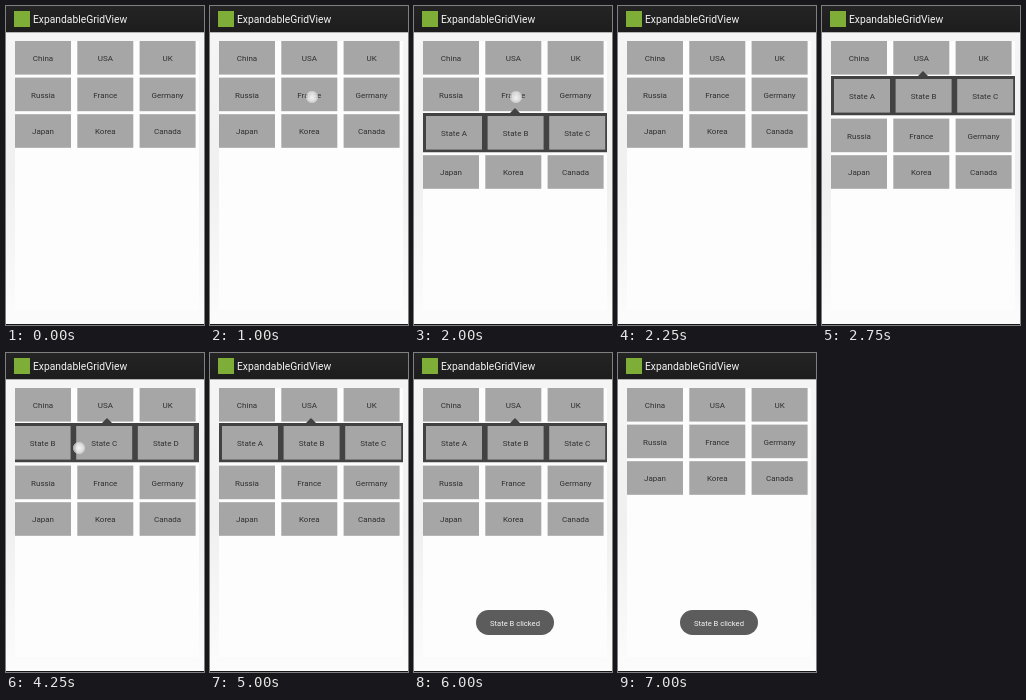
Animation of 198x319 px, one loop 7.25 s. Source, as an HTML page with a canvas:

```html
<!DOCTYPE html>
<html lang="en">
<head>
<meta charset="utf-8">
<title>Expandable grid</title>
<style>
html, body { margin: 0; width: 100%; height: 100%; overflow: hidden; background: #fcfcfc; }
canvas { display: block; width: 198px; height: 319px; }
</style>
</head>
<body>
<canvas id="stage"></canvas>
<script>
const W = 198, H = 319, LOOP = 7250, STEP = 250;
const FONT = 'Roboto, "Open Sans", sans-serif';
const COUNTRIES = ['China', 'USA', 'UK', 'Russia', 'France', 'Germany', 'Japan', 'Korea', 'Canada'];
const STATES = ['State A', 'State B', 'State C', 'State D'];
const COL = 62.3, ROW = 36.6, CELL_W = 56, CELL_H = 33.6;
const PANEL_H = 39.5, SHIFT = 41;

// Horizontal drag in the panel: time and finger x
const DRAG = [[3000, 138], [3500, 124], [3750, 99], [4000, 80], [4250, 73], [4500, 95], [4750, 120]];
const DRAG_END = 5000;
// Taps: start, end, x, y
const TAPS = [[1000, 1500, 102, 91], [2000, 2250, 102, 91], [5500, 5750, 101, 92], [6750, 7000, 101, 54]];

const canvas = document.getElementById('stage');
const ctx = canvas.getContext('2d');
const dpr = window.devicePixelRatio || 1;
canvas.width = W * dpr;
canvas.height = H * dpr;

function rect(x, y, w, h, fill) {
  ctx.fillStyle = fill;
  ctx.fillRect(x, y, w, h);
}

function text(str, x, y, size, fill, align = 'center') {
  ctx.font = `${size}px ${FONT}`;
  ctx.textAlign = align;
  ctx.fillStyle = fill;
  ctx.fillText(str, x, y);
}

function cell(label, x, y) {
  rect(x, y, CELL_W, CELL_H, '#a6a6a6');
  text(label, x + CELL_W / 2, y + 20, 8, '#303030');
}

function openRow(t) {
  if (t >= 1250 && t < 2250) return 1;
  if (t >= 2750 && t < 7000) return 0;
  return -1;
}

function finger(t) {
  if (t >= DRAG[0][0] && t < DRAG_END) {
    const [, x] = DRAG.filter(k => k[0] <= t).pop();
    return { x, y: 95, scroll: DRAG[0][1] - x };
  }
  const tap = TAPS.find(([from, to]) => t >= from && t < to);
  return tap ? { x: tap[2], y: tap[3], scroll: 0 } : null;
}

function drawPage() {
  const side = ctx.createLinearGradient(0, 26, 0, H);
  side.addColorStop(0, '#f5f5f5');
  side.addColorStop(0.5, '#f0f0f0');
  side.addColorStop(1, '#fcfcfc');
  rect(0, 0, W, H, side);
  rect(9, 35, 184, 269, '#fdfdfd');
  rect(0, 318, W, 1, '#161616');

  const bar = ctx.createLinearGradient(0, 0, 0, 26);
  bar.addColorStop(0, '#242424');
  bar.addColorStop(1, '#1d1d1d');
  rect(0, 0, W, 26, bar);
  rect(0, 26, W, 1, '#b4b4b4');
  rect(8, 5, 16, 16, '#7fae38');
  text('ExpandableGridView', 27, 17, 10.3, '#f4f4f4', 'left');
}

function drawPanel(row, scroll) {
  const y = 70 + row * 37;
  ctx.fillStyle = '#424242';
  ctx.beginPath();
  ctx.moveTo(96, y);
  ctx.lineTo(101, y - 5);
  ctx.lineTo(106, y);
  ctx.fill();

  ctx.save();
  ctx.beginPath();
  ctx.rect(9, y, 184, PANEL_H);
  ctx.clip();
  rect(9, y, 184, PANEL_H, '#424242');
  STATES.forEach((s, i) => cell(s, 12 + i * 61.6 - scroll, y + 3));
  ctx.restore();
}

function drawToast(alpha) {
  ctx.save();
  ctx.globalAlpha = alpha;
  ctx.fillStyle = '#5c5c5c';
  ctx.beginPath();
  ctx.roundRect(62, 257, 78, 25, 12.5);
  ctx.fill();
  text('State B clicked', 101, 272.7, 7.6, '#f5f5f5');
  ctx.restore();
}

function drawTouch({ x, y }) {
  const glow = ctx.createRadialGradient(x, y, 0, x, y, 6.5);
  glow.addColorStop(0, 'rgba(255,255,255,.9)');
  glow.addColorStop(0.65, 'rgba(235,235,235,.8)');
  glow.addColorStop(0.9, 'rgba(215,215,215,.65)');
  glow.addColorStop(1, 'rgba(200,200,200,0)');
  ctx.fillStyle = glow;
  ctx.beginPath();
  ctx.arc(x, y, 6.5, 0, Math.PI * 2);
  ctx.fill();
}

function render(now) {
  const t = Math.floor((now % LOOP) / STEP) * STEP;
  const open = openRow(t), touch = finger(t);

  ctx.setTransform(dpr, 0, 0, dpr, 0, 0);
  drawPage();
  COUNTRIES.forEach((name, i) => {
    const row = Math.floor(i / 3);
    const drop = open >= 0 && row > open ? SHIFT : 0;
    cell(name, 9 + (i % 3) * COL, 35 + row * ROW + drop);
  });
  if (open >= 0) drawPanel(open, touch ? touch.scroll : 0);
  if (t >= 5750) drawToast(t < 6000 ? 0.6 : 1);
  if (touch) drawTouch(touch);
}

const start = performance.now();
function tick() {
  render(performance.now() - start);
  requestAnimationFrame(tick);
}
tick();
</script>
</body>
</html>
```
